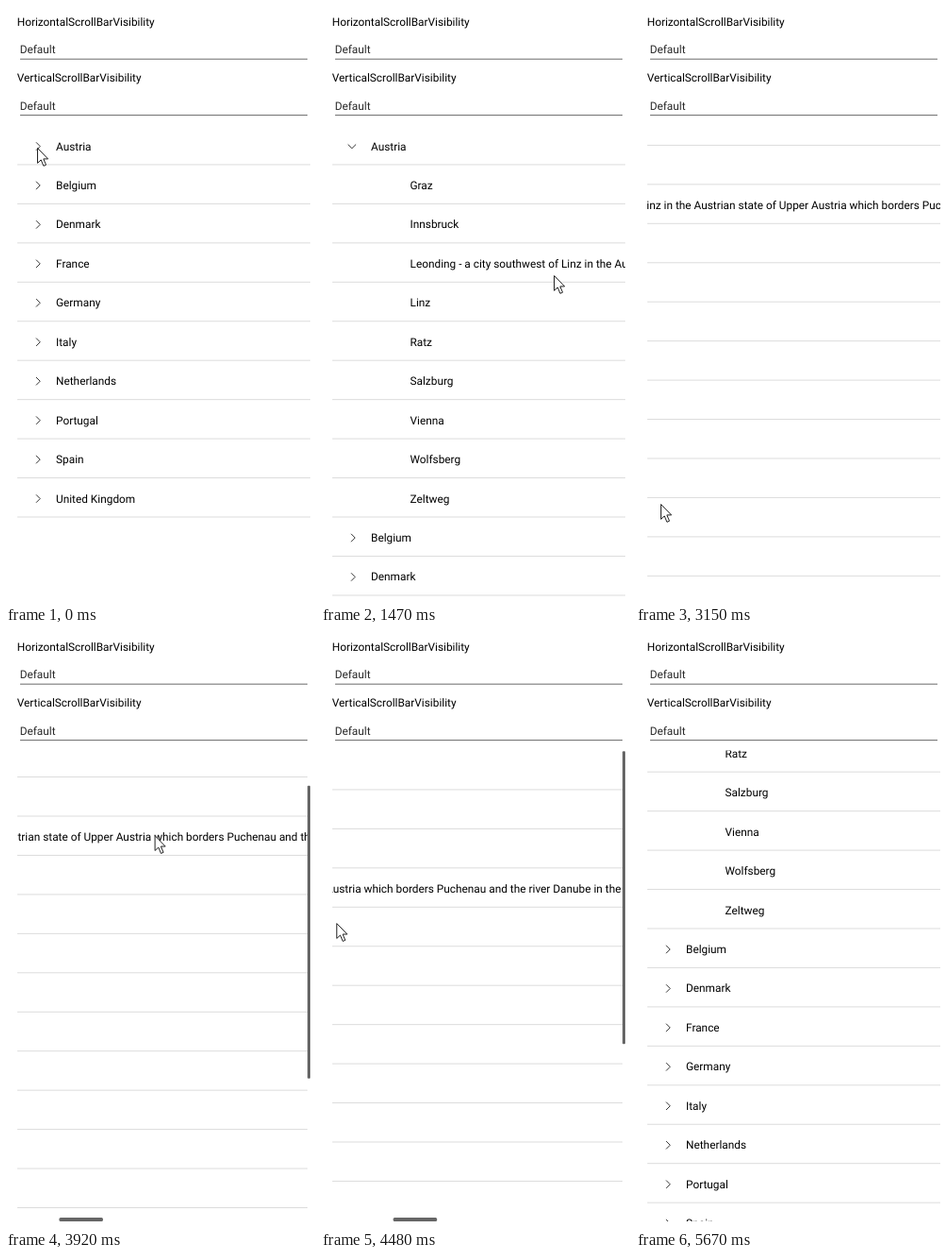
Animation of 328x632 px, one loop 6020 ms. Source, as an HTML page:

```html
<!DOCTYPE html>
<html lang="en">
<head>
<meta charset="utf-8">
<title>Tree list scrolling</title>
<style>
  html, body { margin: 0; width: 100%; height: 100%; overflow: hidden; background: #fff; }
  svg { display: block; width: 328px; height: 632px; }
  text { font: 11.85px Roboto, sans-serif; fill: #000; text-rendering: geometricPrecision; }
  .field { fill: #2a2a2a; }
  .underline { stroke: #6a6a6a; }
  .rule { stroke: #dcdcdc; }
  .chevron { fill: none; stroke: #333; }
  .thumb { fill: #666; }
  .pointer { fill: #fff; stroke: #222; stroke-linejoin: round; }
</style>
</head>
<body>
<svg id="stage" viewBox="0 0 328 632">
  <defs><clipPath id="view"><rect x="12" y="126.5" width="311" height="498.5"/></clipPath></defs>
</svg>
<script>
const LOOP = 6020, STEP = 70;
const ROW = 41.45, TOP = 126.5, LEFT = 12;
const SLOP = 6; // distance a drag travels before the list follows

const countries = ['Austria', 'Belgium', 'Denmark', 'France', 'Germany', 'Italy',
  'Netherlands', 'Portugal', 'Spain', 'United Kingdom'];
const cities = ['Graz', 'Innsbruck',
  'Leonding - a city southwest of Linz in the Austrian state of Upper Austria ' +
  'which borders Puchenau and the river Danube in the north',
  'Linz', 'Ratz', 'Salzburg', 'Vienna', 'Wolfsberg', 'Zeltweg'];

// Pointer moves: [start, end, x, y]; it rests in between.
const moves = [
  [910, 1260, 165, 357], [1260, 1470, 247, 285],
  [1610, 1960, 40, 273], [2170, 2310, 22, 255], [2310, 2450, -9, 217],
  [3080, 3150, 26, 527], [3150, 3360, 90, 612], [3360, 3710, 233, 203],
  [3710, 4270, 84, 229], [4270, 4410, 46, 271], [4410, 4550, 0, 330],
  [4550, 4830, 71, 562], [4830, 4970, 115, 330], [5460, 5600, 304, 382]
];
// Times the pointer holds the list.
const drags = [[1610, 2450], [3710, 4410], [4830, 4970]];

const easeOut = k => 1 - (1 - k) ** 1.5;
const travel = d => Math.sign(d) * Math.max(0, Math.abs(d) - SLOP);

function pointerAt(t) {
  let x = 33, y = 150;
  for (const [start, end, toX, toY] of moves) {
    if (t <= start) break;
    const k = easeOut(Math.min(1, (t - start) / (end - start)));
    x += (toX - x) * k;
    y += (toY - y) * k;
  }
  return [x, y];
}

function scrollAt(t) {
  let x = 0, y = 0;
  for (const [start, end] of drags) {
    if (t <= start) break;
    const [x0, y0] = pointerAt(start);
    const [x1, y1] = pointerAt(Math.min(t, end));
    x = Math.max(0, x + travel(x0 - x1));
    y = Math.max(0, y + travel(y0 - y1));
  }
  // Once the long row has left the view there is nothing to scroll sideways.
  return [y > 4 * ROW ? 0 : x, y];
}

const stage = document.getElementById('stage');

function add(parent, tag, attrs = {}, label) {
  const el = document.createElementNS('http://www.w3.org/2000/svg', tag);
  for (const key in attrs) el.setAttribute(key, attrs[key]);
  if (label) el.textContent = label;
  parent.append(el);
  return el;
}

function addField(label, y) {
  add(stage, 'text', { x: 11.7, y }, label);
  add(stage, 'text', { x: 14.7, y: y + 29.2, class: 'field' }, 'Default');
  add(stage, 'path', { d: `M15 ${y + 35.2}H320`, class: 'underline' });
}

function addRow(label, x) {
  const g = add(list, 'g');
  add(g, 'text', { x, y: 26 }, label);
  add(g, 'path', { d: `M${LEFT} ${ROW}H2070`, class: 'rule' });
  return g;
}

const place = (el, x, y) => el.setAttribute('transform', `translate(${x} ${y})`);
const show = (el, on) => el.setAttribute('visibility', on ? 'visible' : 'hidden');

addField('HorizontalScrollBarVisibility', 21);
addField('VerticalScrollBarVisibility', 80.4);

const view = add(stage, 'g', { 'clip-path': 'url(#view)' });
const list = add(view, 'g');
const right = 'M32 17.8l4.2 4.2l-4.2 4.2';
const down = 'M28.7 20l4.2 4.2l4.2 -4.2';

const parents = countries.map(name => {
  const g = addRow(name, 53);
  add(g, 'path', { d: right, class: 'chevron' });
  return g;
});
const children = cities.map((name, i) => {
  const g = addRow(name, 94.5);
  place(g, 0, (i + 1) * ROW);
  return g;
});
const firstChevron = parents[0].querySelector('.chevron');

const bars = add(view, 'g');
add(bars, 'path', { d: 'M320 126H323V625H320Z', fill: '#fff' });
add(bars, 'path', { d: 'M12 621H323V625H12Z', fill: '#fff' });
const barY = add(bars, 'rect', { x: 320, width: 3, height: 310, rx: 1, class: 'thumb' });
const barX = add(bars, 'rect', { y: 621, width: 46.5, height: 4, rx: 1.5, class: 'thumb' });

const pointer = add(stage, 'path', {
  d: 'M.5 .5V16.3L4.2 12.9L6.9 19.3L9.5 18.2L6.8 11.9H11.6Z', class: 'pointer'
});

function draw(t) {
  const open = t >= 560;
  const [sx, sy] = scrollAt(t);
  place(list, -sx, TOP - sy);
  parents.forEach((g, i) => place(g, 0, (open && i ? i + cities.length : i) * ROW));
  children.forEach(g => {
    show(g, open);
    g.setAttribute('opacity', t < 630 ? 0.5 : 1);
  });
  firstChevron.setAttribute('d', open ? down : right);

  // The thumbs trail the content by one step.
  const [bx, by] = scrollAt(t - STEP);
  barX.setAttribute('x', LEFT + bx * 0.15);
  barY.setAttribute('y', 127.3 + by * 0.62);
  show(bars, (t >= 1680 && t < 3150) || (t >= 3780 && t < 5320));

  const [px, py] = pointerAt(t);
  place(pointer, px, py);
  show(pointer, px > -5 && t < 5670);
}

const start = performance.now();
function tick() {
  const t = (performance.now() - start) % LOOP;
  draw(Math.floor(t / STEP) * STEP);
  requestAnimationFrame(tick);
}
tick();
</script>
</body>
</html>
```
